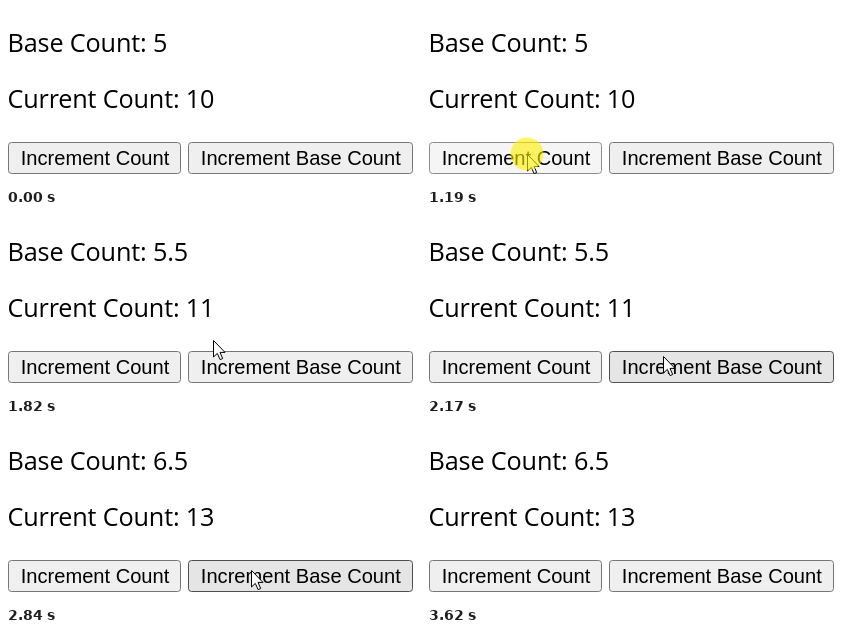
These frames come from a looping animation (415x181 px, 3.88 s). An HTML page:

```html
<!DOCTYPE html>
<html lang="en">
<head>
<meta charset="utf-8">
<title>Counter</title>
<style>
  html, body { margin: 0; width: 100%; height: 100%; overflow: hidden; background: #fff; }
  svg { display: block; width: 415px; height: 181px; }
  .line { font: 25.2px "Open Sans", "Noto Sans", sans-serif; letter-spacing: -.15px; }
  .button rect { fill: #efefef; stroke: #767676; }
  .button.hover rect { fill: #e5e5e5; stroke: #4f4f4f; }
  .button.active rect { fill: #f5f5f5; stroke: #8d8d8d; }
  .button text { font: 20.1px "Liberation Sans", Arial, sans-serif; text-anchor: middle; }
  #halo { fill: #fff000; opacity: .6; }
</style>
</head>
<body>
<svg viewBox="0 0 415 181">
  <text class="line" x="1.5" y="46" id="base"></text>
  <text class="line" x="1.5" y="102" id="current"></text>
  <g class="button">
    <rect x="2.5" y="136.5" width="172" height="31" rx="3"/>
    <text x="89" y="159">Increment Count</text>
  </g>
  <g class="button">
    <rect x="182.5" y="136.5" width="224" height="31" rx="3"/>
    <text x="294.8" y="159">Increment Base Count</text>
  </g>
  <g id="pointer">
    <path d="M.5 .5V17L4.3 13.4L7.1 19.6L9.7 18.5L7 12.4H12Z" fill="#fff" stroke="#000"/>
    <circle id="halo" r="16.5"/>
  </g>
</svg>
<script>
const LOOP = 3880, STEP = 70, HOLD = 130;
const $ = id => document.getElementById(id);
const buttons = [...document.querySelectorAll(".button")];

const linear = u => u;
const slowDown = u => 1 - (1 - u) ** 1.5;
const speedUp = u => u ** 3.5;

// Each move continues from where the previous one stopped; lift bows it upwards
const entry = { x: 145, y: 185 };
const moves = [
  { at: 570, steps: 4, x: 100, y: 139, ease: slowDown },
  { at: 980, steps: 4, x: 100, y: 148, ease: linear },
  { at: 1460, steps: 8, x: 222, y: 134, ease: slowDown, lift: 28 },
  { at: 2030, steps: 5, x: 245, y: 146, ease: linear },
  { at: 2840, steps: 8, x: 323, y: 157, ease: speedUp, lift: 3 },
  { at: 3410, steps: 4, x: 350, y: 185, ease: linear },
];
const clicks = [{ at: 1190, add: 0.5 }, { at: 2510, add: 1 }];

function pointerAt(t) {
  let { x, y } = entry;
  for (const { at, steps, ease, lift = 0, ...to } of moves) {
    if (t < at) break;
    const step = Math.floor((t - at) / STEP) + 1;
    const u = ease(Math.min(1, step / steps));
    x += (to.x - x) * u;
    y += (to.y - y) * u - lift * Math.sin(Math.PI * u);
  }
  return { x: Math.round(x), y: Math.round(y) };
}

function draw(t) {
  const { x, y } = pointerAt(t);
  const pressed = clicks.some(c => t >= c.at && t < c.at + HOLD);
  const base = clicks.reduce((sum, c) => sum + (t >= c.at + HOLD ? c.add : 0), 5);

  $("base").textContent = `Base Count: ${base}`;
  $("current").textContent = `Current Count: ${base * 2}`;
  $("pointer").setAttribute("transform", `translate(${x} ${y})`);
  $("halo").style.display = pressed ? "" : "none";

  for (const button of buttons) {
    const box = button.firstElementChild.getBBox();
    const over = x > box.x && x < box.x + box.width && y > box.y && y < box.y + box.height;
    button.classList.toggle("hover", over);
    button.classList.toggle("active", over && pressed);
  }
}

const origin = performance.now();
function tick() {
  draw((performance.now() - origin) % LOOP);
  requestAnimationFrame(tick);
}
tick();
</script>
</body>
</html>
```
